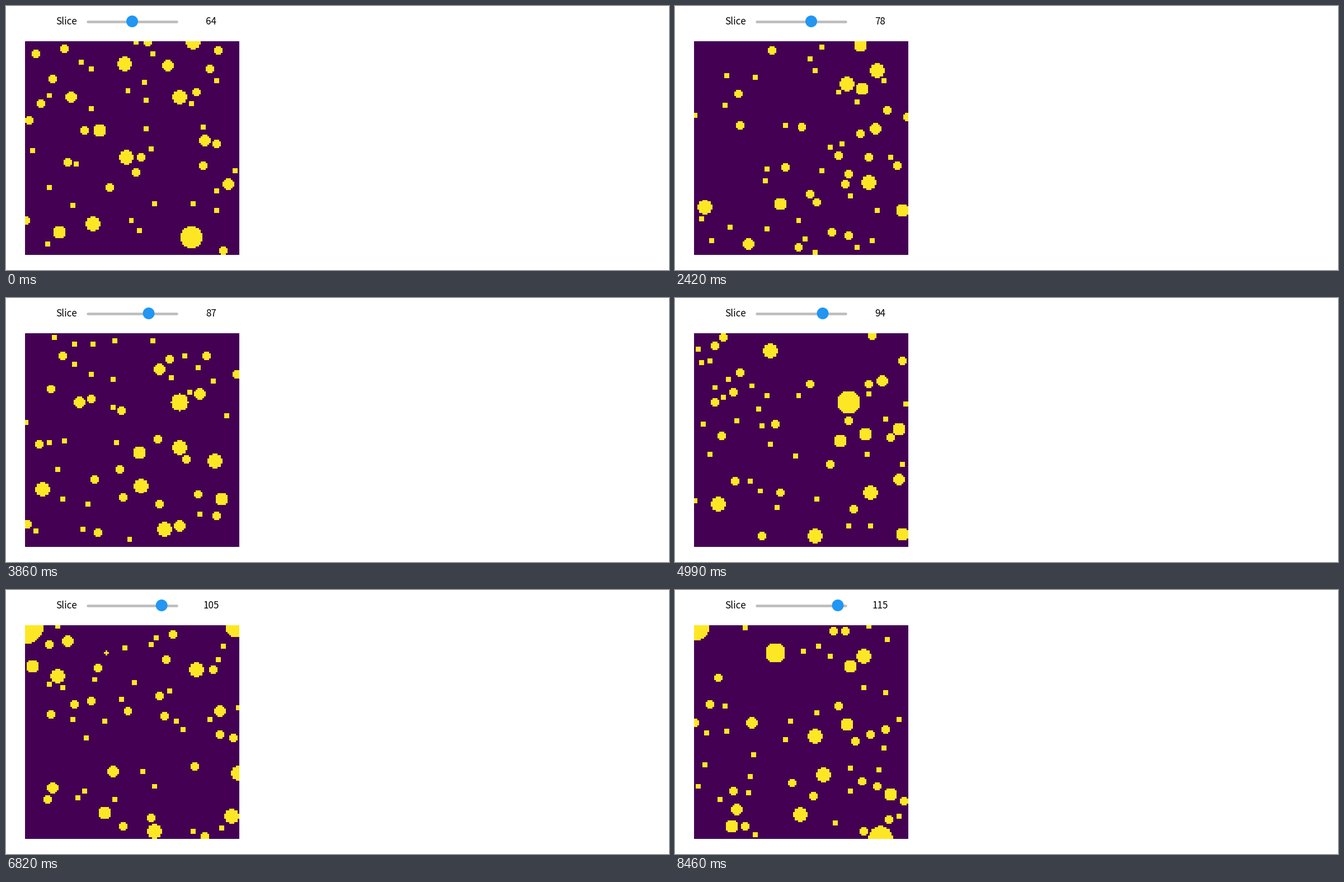
A matplotlib script for the animation above (9.2 s loop, 1185 by 472 pixels).

```python
import numpy as np
import matplotlib.pyplot as plt
from matplotlib.animation import FuncAnimation
from matplotlib.colors import ListedColormap
from matplotlib.patches import Circle

W, H, DPI = 1185, 472, 64
PX = 72 / DPI
LOOP, STEP = 9200, 20
N = 128
Z_MIN, DEPTH = 57, 66

# Ball radii form a geometric series; these are the squared values.
HUGE, BIG, MID, SMALL, TINY = 10 ** (2.1 - 0.4 * np.arange(5))

# The few largest balls: column, row, depth, squared radius
LARGE_BALLS = [(0, 0, 108, HUGE), (99, 117, 67, BIG), (92, 41, 91, BIG),
               (48, 16, 111, BIG), (126, 0, 106, BIG), (111, 127, 115, BIG)]
PER_SLICE = {MID: 1.5, SMALL: 6, TINY: 4}


def pack_balls():
    """Random balls of each size, evenly spread in depth, without overlap."""
    rng = np.random.default_rng(12)
    balls = list(LARGE_BALLS)
    for r2, density in PER_SLICE.items():
        for i in range(int(density * DEPTH)):
            z = Z_MIN + int(i / density)
            for _ in range(50):
                spot = np.array([*rng.integers(0, N, 2), z])
                old = np.array(balls)
                gap2 = ((old[:, :3] - spot) ** 2).sum(axis=1)
                if np.all(gap2 > (np.sqrt(old[:, 3]) + np.sqrt(r2)) ** 2):
                    balls.append((*spot, r2))
                    break
    return np.array(balls, float)


def cut(balls, z):
    """Binary cross-section of the packing at depth z."""
    rows, cols = np.mgrid[:N, :N]
    mask = np.zeros((N, N))
    for c, r, bz, r2 in balls:
        left = r2 - (bz - z) ** 2
        if left > 0:
            mask[(cols - c) ** 2 + (rows - r) ** 2 <= left] = 1
    return mask


def burst(start, end, pace=107):
    """Times of the slider steps in one drag, about one per pace."""
    return np.linspace(start, end, round((end - start) / pace) + 1)


DRAGS = [(160, 240), (410, 590), (740, 740), (1010, 1200), (1380, 1580),
         (1760, 2080), (2220, 3090), (3180, 3280), (3430, 3640), (3860, 4350),
         (4540, 4540), (4710, 4710), (4990, 5890), (6000, 6100), (6360, 6650),
         (6820, 7130), (7310, 8130), (8270, 8460)]

times = np.concatenate([[0]] + [burst(*d) for d in DRAGS])
ticks = (times // STEP).astype(int)
values = np.rint(np.interp(np.arange(len(times)),
                           [0, 10, 19, 31, 39, 54, 68],
                           [64, 72, 78, 87, 94, 105, 115])).astype(int)
# The picture trails the slider by one step.
shown = np.concatenate([values[:1], values[:-1]])

balls = pack_balls()
slices = {z: cut(balls, z) for z in set(shown.tolist())}

fig = plt.figure(figsize=(W / DPI, H / DPI), dpi=DPI, facecolor="white")
ax = fig.add_axes([0, 0, 1, 1])
picture = ax.imshow(slices[64], cmap=ListedColormap(["#440154", "#fde725"]),
                    vmin=0, vmax=1, interpolation="nearest", aspect="auto",
                    extent=(34, 417, 445, 63))
ax.set_xlim(0, W)
ax.set_ylim(H, 0)
ax.axis("off")

font = dict(family="Noto Sans CJK JP", size=17 * PX, color="black", va="baseline")
ax.text(89, 33, "Slice", ha="left", **font)
number = ax.text(367, 33, "64", ha="center", **font)
ax.plot([146.3, 304.7], [27.5, 27.5], color="#bdbdbd", lw=4.6 * PX,
        solid_capstyle="round")
thumb = ax.add_patch(Circle((225.5, 27.5), 10.5, fc="#2196f3", ec="none", zorder=3))


def update(frame):
    k = np.searchsorted(ticks, frame, side="right") - 1
    picture.set_data(slices[int(shown[k])])
    number.set_text(str(values[k]))
    thumb.center = (225.5 + 1.284 * (values[k] - 64), 27.5)
    return picture, number, thumb


anim = FuncAnimation(fig, update, frames=LOOP // STEP, interval=STEP, repeat=True)
plt.show()
```
